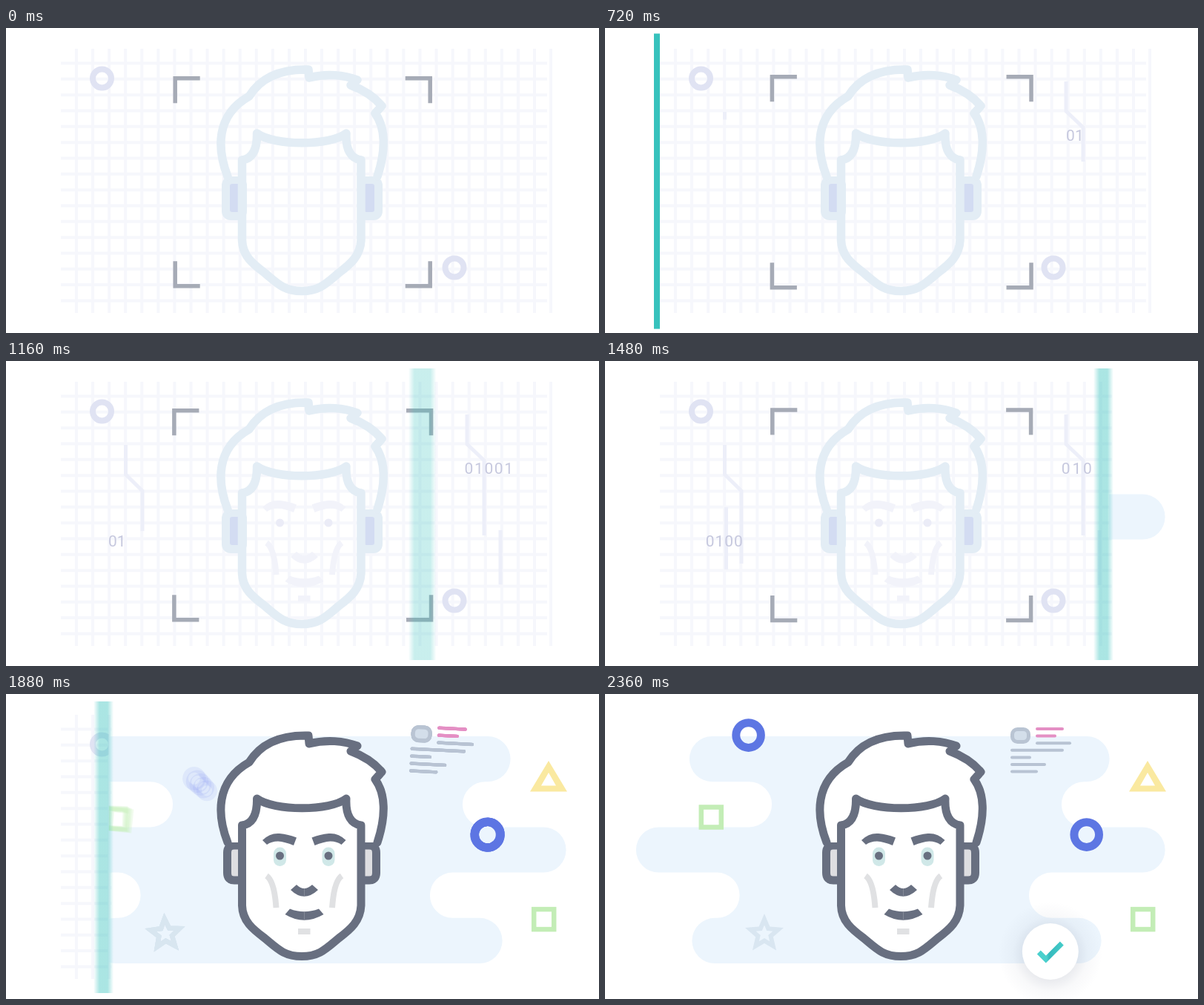
An HTML page that plays this animation: 800 px wide and 411 px high, repeating every 4600 ms.

```html
<!DOCTYPE html>
<html lang="en">
<head>
<meta charset="utf-8">
<title>Face scan</title>
<style>
  html, body { margin: 0; width: 100%; height: 100%; overflow: hidden; background: #fff; }
  svg { display: block; width: 100%; height: 100%; }
  .round { stroke-linecap: round; stroke-linejoin: round; }
  .digits { font: 400 21px Roboto, sans-serif; fill: #c6c8de; }
  .sketch-face { --dark: #f2f3fa; --soft: #f2f3fa; --eye: none; --pupil: #ebecf7; }
  .real-face { --dark: #686f80; --soft: #e0e1e3; --eye: #d0e8e8; --pupil: #686f80; }
</style>
</head>
<body>
<svg viewBox="0 0 800 411" xmlns="http://www.w3.org/2000/svg">
  <defs>
    <clipPath id="keep"><rect id="keepBox" width="800" height="411"/></clipPath>
    <clipPath id="grid"><rect id="gridBox" width="800" height="411"/></clipPath>
    <clipPath id="text"><rect id="textBox" width="800" height="411"/></clipPath>
    <clipPath id="feat"><rect id="featBox" width="800" height="411"/></clipPath>
    <clipPath id="show"><rect id="showBox" width="800" height="411"/></clipPath>
    <linearGradient id="smear">
      <stop offset="0" stop-color="#37c2bd" stop-opacity="0"/>
      <stop id="rise" stop-color="#37c2bd"/>
      <stop id="fall" stop-color="#37c2bd"/>
      <stop offset="1" stop-color="#37c2bd" stop-opacity="0"/>
    </linearGradient>
    <radialGradient id="shade">
      <stop offset=".5" stop-color="#5a6480" stop-opacity=".13"/>
      <stop offset=".72" stop-color="#5a6480" stop-opacity=".04"/>
      <stop offset="1" stop-color="#5a6480" stop-opacity="0"/>
    </radialGradient>
    <linearGradient id="tick" gradientUnits="userSpaceOnUse" x1="-16" y1="0" x2="16" y2="0">
      <stop offset="0" stop-color="#4ad0cd"/>
      <stop offset=".35" stop-color="#4ad0cd"/>
      <stop offset=".45" stop-color="#35b9bd"/>
      <stop offset="1" stop-color="#43cbc8"/>
    </linearGradient>

    <path id="hair" d="M299 200C285 164 282 118 328 92C344 66 372 55 408 56L409 67
      C432 61 456 63 474 70L465 77Q492 87 507 105L498 115C512 134 513 164 501 200"/>
    <path id="jaw" d="M318.500 177C332 175 339 164 338.500 141C362 158 437 158 459 141
      C458 164 466 175 479 177V285C478 306 465 317 449 329C432 343 423 353.500 399 353.500
      C375 353.500 366 343 349 329C333 317 319 306 318.500 285Z"/>
    <g id="half">
      <path fill="var(--dark)" d="M346 197Q356 187 369 188Q381 189 392 193.500L388 204Q376 199 367 198.500Q358 198.500 352 203Z"/>
      <rect fill="var(--eye)" x="361" y="206.500" width="17" height="25.500" rx="8.500"/>
      <circle fill="var(--pupil)" cx="369.500" cy="218" r="5.500"/>
      <path fill="none" stroke="var(--soft)" stroke-width="8" d="M351.500 245Q362 252 364.500 288"/>
    </g>
    <g id="features">
      <use href="#half"/>
      <use href="#half" transform="matrix(-1 0 0 1 804.500 0)"/>
      <path fill="var(--dark)" d="M384 264L392 257Q402 267 413 257L421 264Q402 281.500 384 264Z"/>
      <path fill="var(--dark)" d="M376.500 297L383 289.500Q402 297 422 289.500L428.500 297Q402 312.500 376.500 297Z"/>
      <rect fill="var(--soft)" x="394" y="316" width="16.500" height="8"/>
    </g>
    <path id="ear" d="M316 204H308Q298.500 204 298.500 214V241Q298.500 251 308 251H316"/>
  </defs>

  <g clip-path="url(#grid)"><path id="mesh" fill="none" stroke="#f6f7fc" stroke-width="4"/></g>

  <g clip-path="url(#keep)">
    <g id="wires" fill="none" stroke="#edeff9" stroke-width="5"></g>
    <g fill="none" stroke="#e0e3f3" stroke-width="8">
      <circle cx="129.500" cy="68" r="12.500"/>
      <circle cx="605" cy="323" r="12.500"/>
    </g>
    <g fill="#e3edf5">
      <rect x="291" y="200" width="34" height="59" rx="12"/>
      <rect x="474" y="200" width="34" height="59" rx="12"/>
    </g>
    <g fill="#d3dcf2">
      <rect x="302" y="210" width="14" height="38" rx="3"/>
      <rect x="483" y="210" width="14" height="38" rx="3"/>
    </g>
    <g class="round" fill="none" stroke="#e3edf5" stroke-width="11.500">
      <use href="#hair"/><use href="#jaw" y="1"/>
    </g>
    <g clip-path="url(#feat)"><use class="sketch-face" href="#features"/></g>
    <g id="corners" fill="none" stroke="#a6abb6" stroke-width="5.500"></g>
  </g>
  <g id="codes" class="digits" clip-path="url(#text)"></g>

  <g clip-path="url(#show)">
    <path id="blob" fill="#ecf5fd"/>
    <g id="back"></g>
    <g class="round" fill="#fff" stroke="#686f80" stroke-width="11">
      <use href="#ear" fill="#dedee1"/>
      <use href="#ear" fill="#dedee1" transform="matrix(-1 0 0 1 798 0)"/>
      <use href="#hair"/><use href="#jaw"/>
    </g>
    <use class="real-face" href="#features"/>
    <path d="M402.500 262V272M402.500 293V305" stroke="#8b909d" stroke-width=".8"/>
    <g id="front"></g>
  </g>

  <rect id="bar" fill="url(#smear)"/>

  <g id="badge">
    <circle cy="3" r="70" fill="url(#shade)"/>
    <circle r="38" fill="#fff"/>
    <path id="check" d="M-15.500 1L-6 10.500L15.500 -11" fill="none" stroke="url(#tick)" stroke-width="7"/>
  </g>
</svg>

<script>
const LOOP = 4600, STEP = 40, SHUTTER = 20, COPIES = 5;
const HOME = 70, FAR = 734;
const $ = id => document.getElementById(id);
const clamp = v => Math.max(0, Math.min(1, v));
const part = (t, a, b) => clamp((t - a) / (b - a));
const ease = (t, a, b) => { const u = part(t, a, b); return u * u * (3 - 2 * u); };

function add(parent, name, attrs) {
  const el = document.createElementNS('http://www.w3.org/2000/svg', name);
  set(el, attrs);
  return parent.appendChild(el);
}
function set(el, attrs) {
  for (const k in attrs) el.setAttribute(k, attrs[k]);
}

// Static geometry
let mesh = '';
for (let i = 0; i < 30; i++) mesh += `M${95 + i * 22.07} 28V384`;
for (let i = 0; i < 16; i++) mesh += `M74 ${47.5 + i * 21.33}H730`;
$('mesh').setAttribute('d', mesh);

const turn = (sweep, dy) => `a30.6 30.6 0 0 ${sweep} 0 ${dy}`;
const side = (xs, dy) => xs.map((x, i) => `H${x}${turn(i % 2 ? 0 : 1, dy)}`).join('');
$('blob').setAttribute('d', 'M144.5 57' +
  side([650, 646.5, 725, 602.5, 639], 61.2) +
  side([148, 151, 72.5, 194.5, 144.5], -61.2) + 'Z');

const wires = [
  { d: 'M622 72V112L645 134V235', len: 173, start: 270 },
  { d: 'M667 228V302', len: 74, start: 880 },
  { d: 'M161.500 113V153L184 175V273', len: 170, start: 680 },
  { d: 'M163.500 197V318', len: 121, start: 1160 }
];
for (const w of wires) w.el = add($('wires'), 'path', { d: w.d });

const corners = [[-1, -1], [1, -1], [-1, 1], [1, 1]].map(([sx, sy]) => ({
  sx, sy, el: add($('corners'), 'path', { d: `M${-sx * 33.5} 0H0V${-sy * 33.5}` })
}));

const codes = [
  { x: 622.3, y: 152, start: 540, spread: 680 },
  { x: 138, y: 249.5, start: 960, spread: 1200 }
];
for (const c of codes) c.el = add($('codes'), 'text', { y: c.y });

// Pieces that fly out from the head
const ring = '<circle r="16.800" fill="none" stroke="#5d76e3" stroke-width="11"/>';
const box = '<rect x="-13.500" y="-13.500" width="27" height="27" fill="none" stroke="#c3edb6" stroke-width="6.500"/>';
const star = () => {
  const pts = Array.from({ length: 10 }, (_, i) => {
    const r = i % 2 ? 9 : 19.7, a = i * Math.PI / 5;
    return `${(r * Math.sin(a)).toFixed(2)},${(-r * Math.cos(a)).toFixed(2)}`;
  });
  return `<polygon points="${pts.join(' ')}" fill="none" stroke="#d9e6f1" stroke-width="6"/>`;
};
const card = () => {
  const rows = [[-5, 29], [-5, 19], [-5, 39], [-39, 29], [-39, -15], [-39, 5], [-39, -6]];
  return '<rect x="-38.500" y="-28.500" width="22" height="17" rx="7" fill="#d3deea" stroke="#b9c4d3" stroke-width="5"/>' +
    rows.map(([a, b], i) => `<path class="round" d="M${a} ${-29 + i * 9.6}H${b}" stroke="${i < 2 ? '#e48fc4' : '#b8c3d3'}" stroke-width="4"/>`).join('');
};
const triangle = '<path fill="#fae9a0" fill-rule="evenodd" d="M0 -21L25 20.500H-25ZM0 -5L-10 12.500H10Z"/>';

const flyers = [
  { art: triangle, x: 732, y: 111, start: 1440, dur: 260, spin: 90 },
  { art: box, x: 725.7, y: 303.6, start: 1465, spin: 120 },
  { art: ring, x: 649.7, y: 189.6, start: 1536, spin: 120, wob: 4 },
  { art: star(), x: 215, y: 323.4, start: 1510, spin: -120, wob: -4 },
  { art: box, x: 143.3, y: 166, start: 1570, spin: -120, wob: 2 },
  { art: ring, x: 193.6, y: 55.6, start: 1669, spin: -120, wob: 4 },
  { art: card(), x: 588, y: 76, from: 107, start: 1522, spin: 70, wob: 4, layer: 'front' }
];
for (const f of flyers) {
  f.copies = Array.from({ length: COPIES }, () => {
    const g = add($(f.layer || 'back'), 'g', {});
    g.innerHTML = f.art;
    return g;
  });
}

function pose(f, t) {
  const end = f.start + (f.dur || 344), p = ease(t, f.start, end);
  const swing = Math.sin(Math.PI * part(t, end - 60, end + 220)), wob = f.wob || 0;
  const y0 = f.from || 255;
  return {
    x: 400 + (f.x - 400) * p,
    y: y0 + (f.y - y0) * p,
    s: p * (1 + Math.abs(wob) * 0.012 * swing),
    r: (p - 1) * f.spin + wob * swing
  };
}

function drawFlyer(f, t) {
  const a = pose(f, t - SHUTTER / 2), b = pose(f, t + SHUTTER / 2);
  const blur = Math.hypot(b.x - a.x, b.y - a.y) + Math.abs(b.r - a.r) * 0.3;
  f.copies.forEach((g, i) => {
    const q = pose(f, t + SHUTTER * (i / (COPIES - 1) - 0.5));
    set(g, {
      transform: `translate(${q.x} ${q.y}) rotate(${q.r}) scale(${q.s})`,
      opacity: blur < 0.05 ? (i ? 0 : 1) : 1 / (1 + blur * 0.35)
    });
  });
}

const barX = t => HOME + (FAR - HOME) * (ease(t, 760, 1360) - ease(t, 1360, 2000));

function drawBar(t) {
  const a = barX(t - SHUTTER / 2), b = barX(t + SHUTTER / 2);
  const d = Math.abs(b - a), w = d + 8, ramp = Math.min(8, d) / w;
  const grow = ease(t, 440, 660) * 1.015 - 0.015 * ease(t, 680, 840) - ease(t, 1990, 2160);
  const h = 393 * Math.max(0, grow);
  set($('bar'), { x: Math.min(a, b) - 4, width: w, y: 206.5 - h / 2, height: h });
  const alpha = Math.min(1, 8 / (d || 1));
  set($('rise'), { offset: ramp, 'stop-opacity': alpha });
  set($('fall'), { offset: 1 - ramp, 'stop-opacity': alpha });
}

function render(t) {
  const x = barX(t), back = t > 1360, done = t >= 2000;
  const edge = off => done ? 0 : back ? Math.min(800, x + off) : 800;
  $('keepBox').setAttribute('width', edge(7.5));
  $('gridBox').setAttribute('width', edge(11));
  $('textBox').setAttribute('width', Math.max(0, edge(-12)));
  $('showBox').setAttribute('x', edge(7.5));
  $('featBox').setAttribute('width', back ? 800 : x);

  for (const w of wires) {
    const len = clamp((t - w.start) * 0.262 / w.len) * w.len;
    set(w.el, { 'stroke-dasharray': `${len} 999`, visibility: len ? 'visible' : 'hidden' });
  }

  const pulse = t < 280 ? 0 : (1 - Math.cos((t - 280) / 720 * 2 * Math.PI)) / 2;
  for (const c of corners) {
    const cx = 400.2 + c.sx * (172 + 3.2 * pulse), cy = 207.7 + c.sy * (140 + 2.3 * pulse);
    c.el.setAttribute('transform', `translate(${cx} ${cy})`);
  }

  for (const c of codes) {
    const n = Math.max(0, Math.floor((t - c.start) / 140) + 1);
    const gap = Math.max(0, t - c.spread) * 0.0035;
    c.el.textContent = '01001'.slice(0, n);
    set(c.el, { x: c.x - 2.3 * gap, 'letter-spacing': gap });
  }

  for (const f of flyers) drawFlyer(f, t);
  drawBar(t);

  const pop = ease(t, 1980, 2220) * 1.08 - 0.08 * ease(t, 2220, 2360);
  $('badge').setAttribute('transform', `translate(600.8 347) scale(${pop})`);
  const ink = 44 * ease(t, 2120, 2340);
  set($('check'), { 'stroke-dasharray': `${ink} 99`, visibility: ink ? 'visible' : 'hidden' });
}

const begin = performance.now();
function tick() {
  const t = (performance.now() - begin) % LOOP;
  render(Math.floor(t / STEP) * STEP);
  requestAnimationFrame(tick);
}
tick();
</script>
</body>
</html>
```
